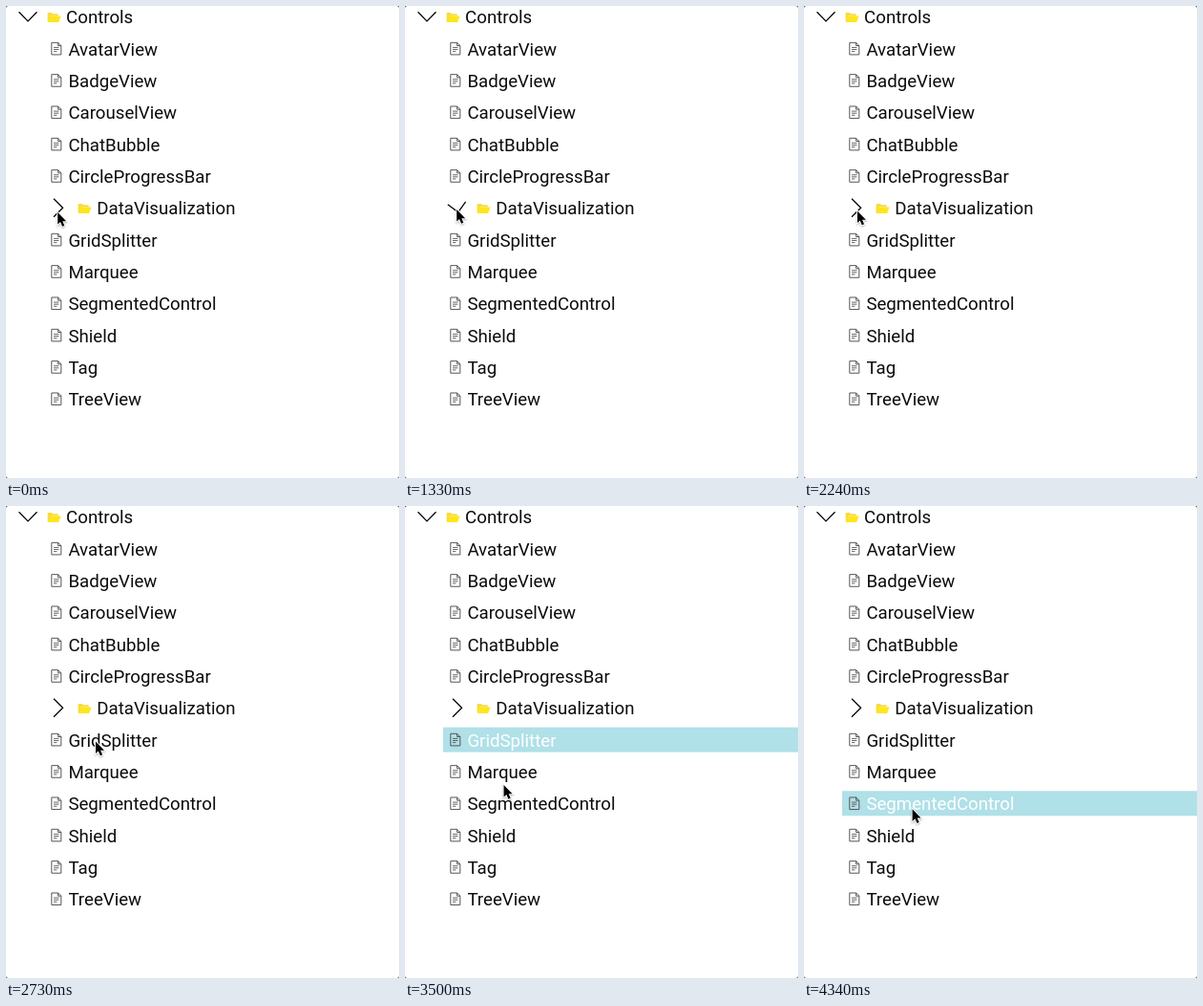
Recreate the animation shown at these times as an HTML page with a canvas. Size 412 by 494 pixels, loop 4.55 s.

```html
<!DOCTYPE html>
<html lang="en">
<head>
<meta charset="utf-8">
<title>Tree view</title>
<style>
  html, body { margin: 0; width: 100%; height: 100%; overflow: hidden; background: #fff; }
  canvas { display: block; }
</style>
</head>
<body>
<canvas></canvas>
<script>
const W = 412, H = 494, LOOP = 4550, STEP = 70, PITCH = 33.33, TOP = 11.8;
const canvas = document.querySelector('canvas');
const ctx = canvas.getContext('2d');
const ratio = window.devicePixelRatio || 1;
canvas.width = W * ratio;
canvas.height = H * ratio;
canvas.style.width = W + 'px';
canvas.style.height = H + 'px';

const before = ['AvatarView', 'BadgeView', 'CarouselView', 'ChatBubble', 'CircleProgressBar'];
const charts = ['Area Chart', 'Bar Chart', 'Line Chart'];
const after = ['GridSplitter', 'Marquee', 'SegmentedControl', 'Shield', 'Tag', 'TreeView'];

const docOutline = new Path2D('M-5-6.4H1.8L5-3.2V6.2H-5ZM1.8-6.4V-3.2H5');
const docLines = new Path2D('M-2.8-1.3H2.6M-2.8 .8H2.6M-2.8 2.9H.6');
const folderBack = new Path2D('M-6.6 4.6V-4.2Q-6.6-5-5.8-5H-2.4L-1.2-3.7H3.8Q4.6-3.7 4.6-2.9V-1.6H-3L-5.6 4.6Z');
const folderFront = new Path2D('M-3.5-1.4H7.4L4.9 4.9H-6.4Z');
const chevron = new Path2D('M-9.5-5L0 4.6L9.5-5');
const arrow = new Path2D('M0 0V12.6L2.8 10L4.9 14.8L7.1 13.8L5.1 9.2H9Z');

const clamp = u => Math.min(1, Math.max(0, u));
const progress = (t, start, length) => clamp((t - start) / length);
const smooth = u => u * u * (3 - 2 * u);
const bezier = (a, b, c, u) => a * (1 - u) ** 2 + 2 * b * u * (1 - u) + c * u * u;

function at(x, y, draw, angle = 0) {
  ctx.save();
  ctx.translate(x, y);
  ctx.rotate(angle);
  draw();
  ctx.restore();
}

function label(text, x, y, color = '#0c0c0c') {
  ctx.fillStyle = color;
  ctx.fillText(text, x, y + 6.6);
}

function leaf(text, row, indent, selected) {
  const y = TOP + row * PITCH;
  if (selected) {
    ctx.fillStyle = '#b0e0e8';
    ctx.fillRect(40, y - 13.5, W - 40, 26);
  }
  at(52.8 + indent, y - .4, () => {
    ctx.strokeStyle = '#555';
    ctx.lineWidth = 1;
    ctx.stroke(docOutline);
    ctx.lineWidth = .9;
    ctx.stroke(docLines);
  });
  label(text, 65.4 + indent, y, selected ? '#fff' : undefined);
}

function branch(text, row, x, textX, angle) {
  const y = TOP + row * PITCH;
  at(x, y - .5, () => {
    ctx.strokeStyle = '#000';
    ctx.lineWidth = 1.25;
    ctx.stroke(chevron);
  }, angle);
  at(x + 27.2, y + .2, () => {
    ctx.fillStyle = '#f8dc3c';
    ctx.fill(folderBack);
    ctx.fillStyle = '#ffe51e';
    ctx.fill(folderFront);
  });
  label(text, textX, y);
}

function pointer(t) {
  if (t < 2170) return [54.2, 216 - 3 * smooth(progress(t, 0, 210))];
  const u = smooth(progress(t, 2170, 560));
  const v = smooth(progress(t, 3220, 560));
  if (v === 0) return [54.2 + 39.8 * u, 213 + 33.5 * u];
  return [bezier(94, 103.3, 113.6, v), bezier(246.5, 302, 317.3, v)];
}

function drawPointer([x, y]) {
  at(x, y, () => {
    ctx.shadowColor = 'rgba(0,0,0,.3)';
    ctx.shadowBlur = 2 * ratio;
    ctx.shadowOffsetY = ratio;
    ctx.strokeStyle = '#fff';
    ctx.lineWidth = 1.8;
    ctx.stroke(arrow);
    ctx.shadowColor = 'transparent';
    ctx.fillStyle = '#000';
    ctx.fill(arrow);
  });
}

function drawStage() {
  ctx.fillStyle = '#444';
  ctx.fillRect(0, 0, W, H);
  ctx.fillStyle = '#fff';
  ctx.beginPath();
  ctx.roundRect(0, 0, W, H, 2.5);
  ctx.fill();
}

function render(t) {
  ctx.setTransform(ratio, 0, 0, ratio, 0, 0);
  ctx.font = '18.67px Roboto, sans-serif';
  drawStage();

  const open = t >= 350 && t < 1330;
  const turn = progress(t, 310, 250) - progress(t, 1305, 250);
  const selected = t >= 4340 ? 'SegmentedControl' : t >= 3010 ? 'GridSplitter' : '';

  branch('Controls', 0, 23, 63.1, 0);
  before.forEach((name, i) => leaf(name, i + 1, 0));
  branch('DataVisualization', 6, 55, 95.3, (turn - 1) * Math.PI / 2);
  if (open) charts.forEach((name, i) => leaf(name, i + 7, 32.1));
  const first = open ? 7 + charts.length : 7;
  after.forEach((name, i) => leaf(name, first + i, 0, name === selected));
  drawPointer(pointer(t));
}

const begin = performance.now();
function tick() {
  const t = (performance.now() - begin) % LOOP;
  render(Math.floor(t / STEP) * STEP);
  requestAnimationFrame(tick);
}
tick();
</script>
</body>
</html>
```
